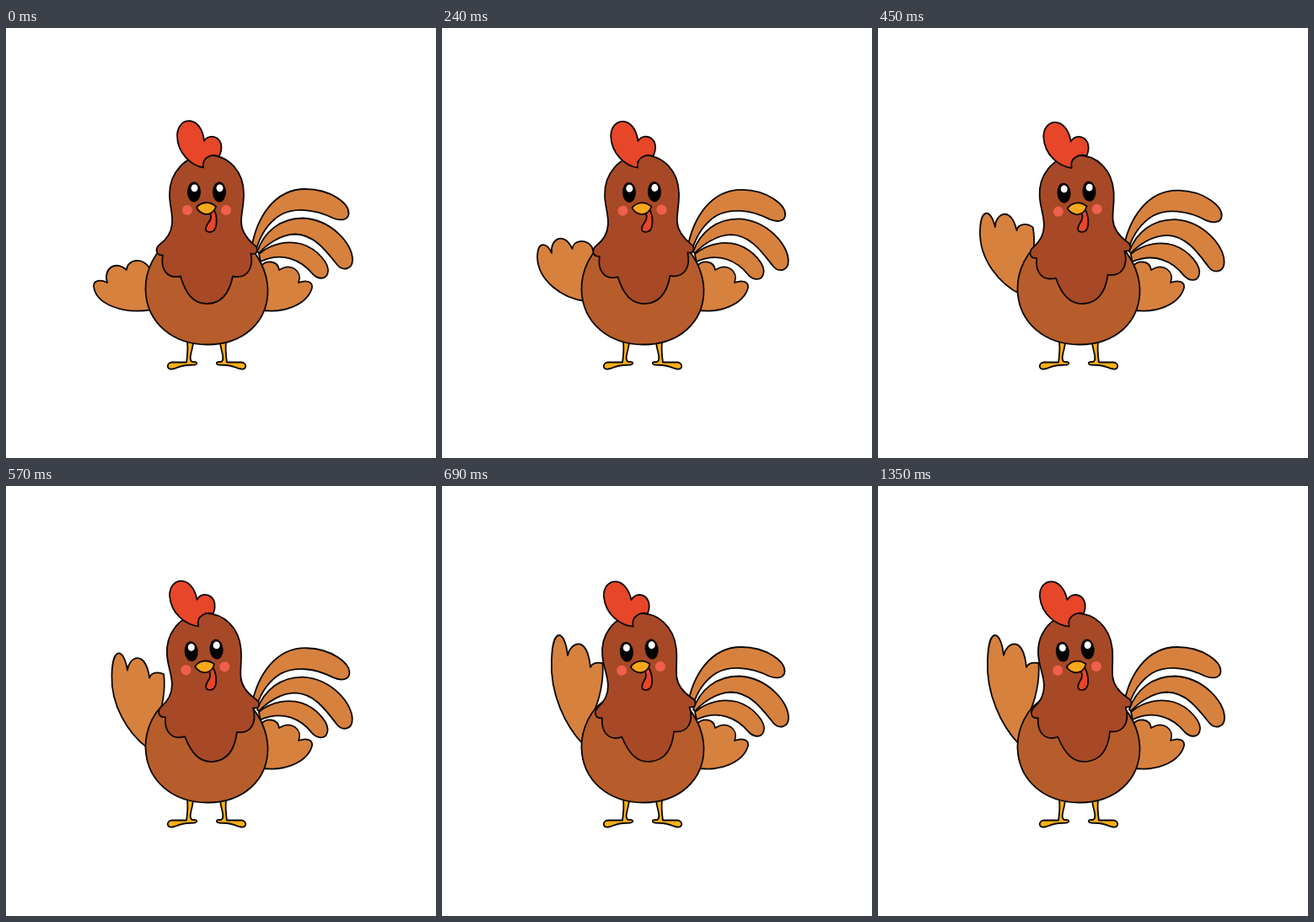
These frames come from a looping animation (510x510 px, 4500 ms). An HTML page:

```html
<!DOCTYPE html>
<html lang="en">
<head>
<meta charset="utf-8">
<title>Waving rooster</title>
<style>
  html, body { margin: 0; width: 100%; height: 100%; overflow: hidden; background: #fff; }
  svg { display: block; width: 100vw; height: 100vh; }
  .line { stroke: #0b0705; stroke-width: 1.8; stroke-linejoin: round; stroke-linecap: round; }
  .feather { fill: #d7813e; }
  .body { fill: #b75d2b; }
  .head { fill: #a74926; }
  .red { fill: #e74629; }
  .leg { fill: #fbb017; }
  .beak { fill: #f9a71b; }
  .cheek { fill: #ef5f4d; }
  .none { fill: none; }
</style>
</head>
<body>
<svg viewBox="0 0 510 510">
  <defs>
    <path id="leg" class="line leg" d="M215 372C216 382 215 390 214 396.5L197 396.5C190 397 190 405.5 197 404.5C205 403 206 400.5 214 400L223 399.5C227.500 399 227 395.500 223 396C219 396.500 218 393 219 388C220 382 222 378 222 372Z"/>
  </defs>

  <g id="tail" class="line feather">
    <path d="M291 262C297 225 318 191 355 191C385 191 407 208 406.500 220C406 228 397 229 388 225.500C365 214 341 213 325 222C311 231 302 245 297 262Z"/>
    <path d="M298 265C306 242 325 225.500 352 225.500C385 227 411 255 411 275C411 286 400 289 393 281C380 265 366 245 343 244.500C325 245 309 257 300 267Z"/>
    <path d="M300 268C315 255 335 252 350 256C370 262 385 281 381.500 291C379 299 370 298 364 292C350 275 328 265 302 277Z"/>
  </g>
  <path class="line feather" d="M300 334C330 340 358 327 363 308C364 300 355 299 347 302C352 288 338 278 324 287C322 275 308 275 302 283L298 300Z"/>
  <path id="wing" class="line feather"/>

  <use href="#leg"/>
  <use href="#leg" transform="matrix(-1 0 0 1 476 0)"/>
  <path class="line body" d="M200 250C175 262 165 290 165.500 311C167 350 198 375.500 239 375.500C280 375.500 311 350 310.500 310C310 290 300 268 280 250Z"/>

  <g id="head">
    <path class="line head" d="M238 150.500C212 151 194 172 194 197C194 211 198 220 197 232C196 244 189 252 182 257C177 261 177 270 186 269.500C183 285 190 298 207 294.500C213 315 222 327 238 327C255 327 265 314 269 294.500C285 298 294 286 290.500 267.500C299 270 300 261 294 257C286 250 279 242 279 230C279 219 282 211 282 197C282 172 266 150.500 238 150.500Z"/>
    <path class="line red" d="M234 165.500C220 163 203 149 203 127C204 104 232 103 235 134C243 122 263 132 252.500 152.500C246 149 232 152 234 165.500Z"/>
    <circle class="cheek" cx="215" cy="216" r="6"/>
    <circle class="cheek" cx="261" cy="216" r="6"/>
    <path class="line red" d="M246 214C251 222 252 242 242 242C234 242 237 235 240 231C244 227 244 221 241 218Z"/>
    <path class="line beak" d="M226 213C231 206 242 205 249 212C247 218 242 221 237 221C232 220 228 217 226 213Z"/>
    <g id="open">
      <ellipse cx="223" cy="194.500" rx="8" ry="12"/>
      <ellipse cx="253" cy="194.500" rx="8" ry="12"/>
      <g fill="#fff">
        <ellipse cx="223.500" cy="189.800" rx="4" ry="4.400"/>
        <ellipse cx="253.500" cy="189.800" rx="4" ry="4.400"/>
      </g>
    </g>
    <g id="shut">
      <ellipse class="body" cx="223" cy="194.500" rx="8" ry="12"/>
      <ellipse class="body" cx="253" cy="194.500" rx="8" ry="12"/>
      <path class="line none" d="M214 195.500Q222.500 201 231 196M245 195Q253 200 261 194"/>
    </g>
  </g>
</svg>
<script>
  const LOOP = 4500, STEP = 30, WAVE = 690, BLINK = [1200, 1350];
  const [tail, wing, head, open, shut] =
    ['tail', 'wing', 'head', 'open', 'shut'].map(id => document.getElementById(id));

  // Wing outline: a start point, then cubic segments.
  const LOW = [173, 334,
    140, 340, 106, 328, 104, 306,
    104, 299, 112, 298, 120, 302,
    115, 285, 130, 275, 143, 287,
    143, 275, 162, 270, 171, 286,
    176, 290, 182, 300, 182, 310];
  const HIGH = [167, 306,
    146, 284, 128, 246, 130, 207,
    131, 166, 146, 170, 149, 201,
    152, 186, 172, 175, 176, 215,
    178, 210, 184, 209, 190.5, 210,
    192, 230, 187, 255, 178, 272];

  function wingPath(p) {
    const v = LOW.map((a, i) => (a + (HIGH[i] - a) * p).toFixed(2));
    return `M${v.slice(0, 2)}C${v.slice(2)}Z`;
  }

  // Speeds up evenly at first, then keeps a constant rate.
  function lean(t) {
    const ramp = 190, rate = 1 / (WAVE - ramp / 2);
    return t < ramp ? rate * t * t / (2 * ramp) : rate * (t - ramp / 2);
  }

  function draw(time) {
    const t = Math.floor(time % LOOP / STEP) * STEP;
    const wave = Math.min(t, WAVE), p = wave / WAVE;
    const wag = 1.6 * Math.sin(Math.PI * p ** 1.6);
    const blink = t >= BLINK[0] && t < BLINK[1];
    wing.setAttribute('d', wingPath(p));
    head.setAttribute('transform', `rotate(${-6 * lean(wave)} 241 235)`);
    tail.setAttribute('transform', `rotate(${wag} 296 262)`);
    open.style.display = blink ? 'none' : '';
    shut.style.display = blink ? '' : 'none';
  }

  const start = performance.now();
  function tick() {
    draw(performance.now() - start);
    requestAnimationFrame(tick);
  }
  tick();
</script>
</body>
</html>
```
